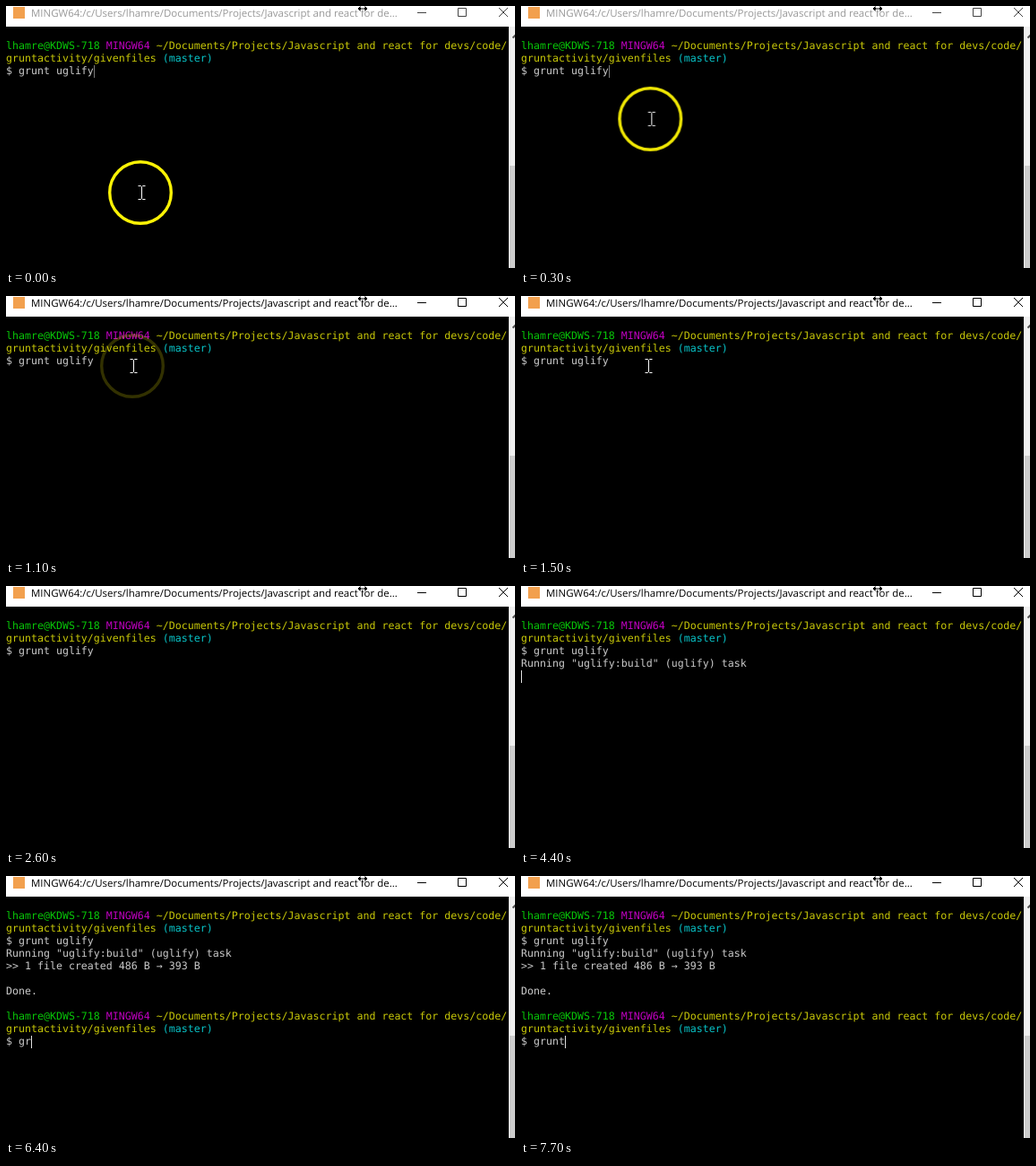
An HTML page for the animation above (8000 ms loop, 568x292 px).

```html
<!DOCTYPE html>
<html lang="en">
<head>
<meta charset="utf-8">
<title>Terminal</title>
<style>
  html, body { margin: 0; width: 100%; height: 100%; overflow: hidden; background: #fff; }
  svg { display: block; }
  text { text-rendering: geometricPrecision; white-space: pre; }
  .term { font: 11.627px "DejaVu Sans Mono", "Liberation Mono", monospace; fill: #cacaca; }
  .user { fill: #08c808; }
  .sys { fill: #c000c0; }
  .path { fill: #c8c808; }
  .branch { fill: #08c4c8; }
  .caption { font: 11.48px "Open Sans", "Noto Sans", sans-serif; }

  /* One loop is 8 s, so 1.25% is 100 ms. */
  .step { animation: 8s step-end infinite; }
  .caption { animation-name: focus-text; }
  .buttons { animation-name: focus-buttons; }
  .task { animation-name: task; }
  .result { animation-name: result; }
  .next { animation-name: next; }
  .caret { animation-name: caret; }
  .blink { animation-name: blink; }
  .beam { animation-name: beam; }
  .mouse { animation: mouse 8s ease-in-out infinite; }
  .ring { animation: ring 8s linear infinite; }

  @keyframes focus-text { 0% { fill: #999; } 6.25%, 100% { fill: #000; } }
  @keyframes focus-buttons { 0% { stroke: #444; } 6.25%, 100% { stroke: #000; } }
  @keyframes task { 0% { opacity: 0; } 55%, 100% { opacity: 1; } }
  @keyframes result { 0% { opacity: 0; } 57.5%, 100% { opacity: 1; } }
  @keyframes next { 0% { opacity: 0; } 58.75%, 100% { opacity: 1; } }
  @keyframes beam { 0% { opacity: 1; } 20%, 100% { opacity: 0; } }

  @keyframes caret {
    0% { transform: translate(98px, 66px); }
    20% { transform: translate(0, 80px); }
    55% { transform: translate(0, 94px); }
    58.75% { transform: translate(14px, 178px); }
    73.75% { transform: translate(21px, 178px); }
    80% { transform: translate(28px, 178px); }
    82.5% { transform: translate(35px, 178px); }
    88.75% { transform: translate(42px, 178px); }
    95%, 100% { transform: translate(49px, 178px); }
  }
  @keyframes blink {
    0% { opacity: .55; }
    6.25%, 20%, 35%, 47.5%, 72.5%, 80%, 88.75%, 95%, 100% { opacity: 1; }
    12.5%, 27.5%, 40%, 65%, 78.75%, 87.5%, 93.75% { opacity: 0; }
  }
  @keyframes mouse {
    0%, 1.25% { transform: translate(150px, 208px); }
    5.6%, 100% { transform: translate(141px, 78px); }
  }
  @keyframes ring {
    0%, 3.3% { opacity: 1; }
    16.4%, 100% { opacity: 0; }
  }
</style>
</head>
<body>
<svg width="568" height="292" viewBox="0 0 568 292">
  <rect width="568" height="292" fill="#fff"/>

  <!-- Title bar -->
  <rect x="8" y="1" width="13" height="13" fill="#f2a04e"/>
  <text class="caption step" x="28" y="12">MINGW64:/c/Users/lhamre/Documents/Projects/Javascript and react for de...</text>
  <g class="buttons step" fill="none">
    <path d="M459 7.5h10M504.500 2.500h9v9h-9z"/>
    <path d="M550 2l10 10M560 2l-10 10"/>
  </g>
  <path d="M392 3l4-4v3h4v-3l4 4-4 4v-3h-4v3z" stroke="#fff"/>

  <!-- Scroll bar -->
  <rect x="561" y="23" width="7" height="269" fill="#f0f0f0"/>
  <rect x="562" y="178" width="6" height="114" fill="#cdcdcd"/>
  <path d="M565.500 35.500l3-3" stroke="#505050" stroke-width="2"/>

  <!-- Terminal -->
  <rect y="23" width="561" height="269"/>
  <g class="term">
    <g id="prompt">
      <text y="48"><tspan class="user">lhamre@KDWS-718</tspan> <tspan class="sys">MINGW64</tspan> <tspan class="path">~/Documents/Projects/Javascript and react for devs/code/</tspan></text>
      <text y="62"><tspan class="path">gruntactivity/givenfiles</tspan> <tspan class="branch">(master)</tspan></text>
    </g>
    <text y="76">$ grunt uglify</text>
    <text class="task step" y="90">Running "uglify:build" (uglify) task</text>
    <g class="result step">
      <text y="104">&gt;&gt; 1 file created 486 B → 393 B</text>
      <text y="132">Done.</text>
    </g>
    <g class="next step">
      <use href="#prompt" y="112"/>
      <text y="188">$ grunt</text>
    </g>
  </g>

  <!-- The caret drags a black cover that hides what is not typed yet -->
  <g class="caret step">
    <rect width="42" height="14"/>
    <rect class="blink step" width="1" height="14" fill="#e0e0e0"/>
  </g>

  <!-- Mouse pointer -->
  <g class="mouse" fill="none">
    <circle class="ring" r="34.300" stroke="#fbf205" stroke-width="3.400"/>
    <path class="beam step" d="M-2.500 -7.500h3l1 1 1-1h3M1.500 -6.500v13M-2.500 7.500h3l1-1 1 1h3" stroke="#fff"/>
  </g>
</svg>
</body>
</html>
```
